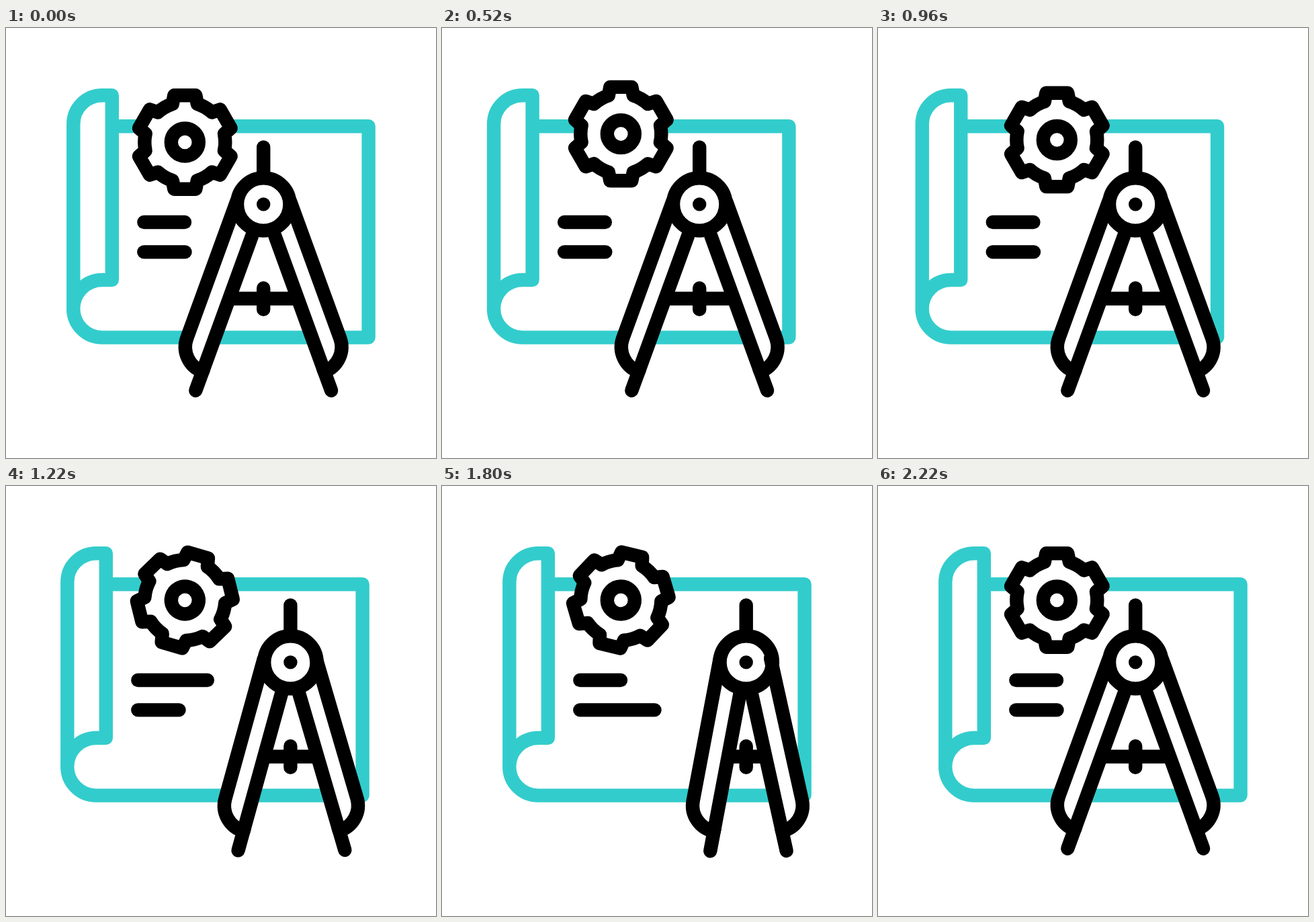
Write an HTML page with a canvas that moves like this. It is 640 px wide and 640 px high and loops after 2.4 s.

```html
<!DOCTYPE html>
<html lang="en">
<head>
<meta charset="utf-8">
<title>Blueprint and compass</title>
<style>
  html, body { margin: 0; width: 100%; height: 100%; overflow: hidden; background: #fff; }
  canvas { display: block; }
</style>
</head>
<body>
<canvas id="stage" width="640" height="640"></canvas>
<script>
const ctx = document.getElementById('stage').getContext('2d');
const LOOP = 2400, TEAL = '#33cccc', BLACK = '#000', WHITE = '#fff';
const RAD = Math.PI / 180;

// Keyframes as [time, value], eased in and out between neighbours
const paperX = [[200, 0], [800, -42], [1400, 0]];
const gearY = [[200, 0], [400, -36], [600, 0], [800, -36], [1000, 0]];
const gearTurn = [[1000, 0], [2200, 180]];
const compassX = [[1000, 0], [1400, 69.5], [1800, 69.5], [2200, 0]];
const closing = [[1000, 0], [1400, 0.85], [1800, 1], [2200, 0]];
const upperLine = [[1000, 0], [1400, 74], [1800, 0]];
const lowerLine = [[1400, 0], [1800, 50], [2200, 0]];

const paper = new Path2D('M158 146.2H539.6V460.6H143a42.8 42.8 0 0 1 0-85.6H157.8V100.3H143' +
  'a42.7 42.7 0 0 0-42.7 42.7V417.8');
const leg = new Path2D('M-39 10V226A39 39 0 0 0 0 265V50');
const foot = new Path2D('M0 260V295');
const gear = gearPath();

function valueAt(keys, t) {
  const next = keys.findIndex(key => key[0] > t);
  if (next === 0) return keys[0][1];
  if (next < 0) return keys[keys.length - 1][1];
  const [t0, a] = keys[next - 1], [t1, b] = keys[next];
  const u = (t - t0) / (t1 - t0);
  return a + (b - a) * u * u * (3 - 2 * u);
}

function gearPath() {
  const path = new Path2D();
  const tooth = [[-18.5, -57], [-16, -69.7], [16, -69.7], [18.5, -57]];
  const valley = Math.atan2(18.5, 57);
  for (let i = 0; i < 6; i++) {
    const angle = i * Math.PI / 3, c = Math.cos(angle), s = Math.sin(angle);
    for (const [x, y] of tooth) path.lineTo(x * c - y * s, x * s + y * c);
    const start = angle - Math.PI / 2;
    path.arc(0, 0, 60, start + valley, start + Math.PI / 3 - valley);
  }
  path.closePath();
  return path;
}

function line(x1, y1, x2, y2) {
  ctx.beginPath();
  ctx.moveTo(x1, y1);
  ctx.lineTo(x2, y2);
  ctx.stroke();
}

function disc(r, fill, outlined) {
  ctx.beginPath();
  ctx.arc(0, 0, r, 0, 2 * Math.PI);
  ctx.fillStyle = fill;
  ctx.fill();
  if (outlined) ctx.stroke();
}

function group(x, y, paint) {
  ctx.save();
  ctx.translate(x, y);
  paint();
  ctx.restore();
}

function drawPaper(t) {
  ctx.strokeStyle = TEAL;
  ctx.stroke(paper);
  ctx.strokeStyle = BLACK;
  line(205.3, 289, 266 + valueAt(upperLine, t), 289);
  line(205.3, 333.4, 266.5 + valueAt(lowerLine, t), 333.4);
}

function drawGear(t) {
  ctx.rotate(valueAt(gearTurn, t) * RAD);
  ctx.fillStyle = WHITE;
  ctx.fill(gear);
  ctx.stroke(gear);
  disc(20.5, WHITE, true);
}

function drawCompass(t) {
  const q = valueAt(closing, t);
  const left = (20 - 9.3 * q) * RAD, right = (20 - 7.5 * q) * RAD;

  function eachLeg(paint) {
    group(1.3 * q, -8.9 * q, () => { ctx.rotate(left); paint(); });
    group(-3.9 * q, -7.5 * q, () => { ctx.scale(-1, 1); ctx.rotate(right); paint(); });
  }

  ctx.fillStyle = WHITE;
  eachLeg(() => ctx.fill(leg));
  ctx.lineCap = 'butt';
  line(-140 * Math.tan(left), 140.4, 140 * Math.tan(right), 140.4);
  ctx.lineCap = 'round';
  line(0, 124.7, 0, 156.5);
  line(0, -85, 0, -45);
  disc(39.2, WHITE, true);
  disc(10.2, BLACK);
  eachLeg(() => { ctx.stroke(leg); ctx.stroke(foot); });
}

function draw(now) {
  const t = now % LOOP;
  ctx.fillStyle = WHITE;
  ctx.fillRect(0, 0, 640, 640);
  ctx.lineWidth = 20.4;
  ctx.lineCap = ctx.lineJoin = 'round';
  group(valueAt(paperX, t), 0, () => drawPaper(t));
  ctx.strokeStyle = BLACK;
  group(266.3, 170 + valueAt(gearY, t), () => drawGear(t));
  group(383.2 + valueAt(compassX, t), 262.4, () => drawCompass(t));
  requestAnimationFrame(draw);
}

requestAnimationFrame(draw);
</script>
</body>
</html>
```
